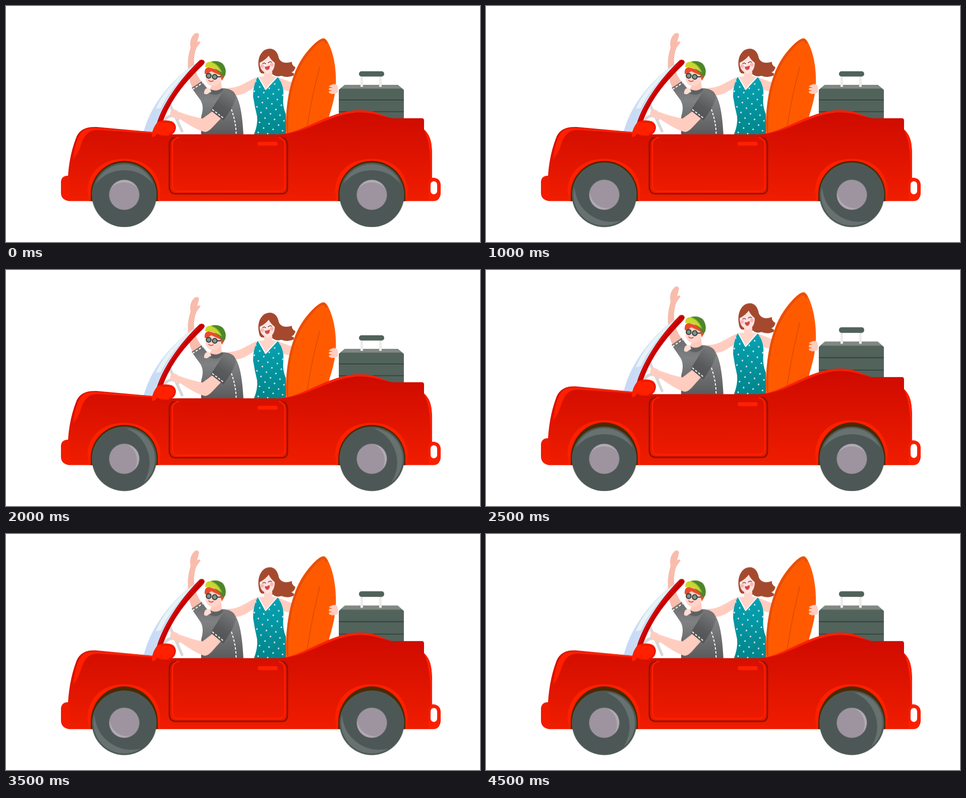
An HTML page for the animation above (5 s loop, 940x470 px).

```html
<!DOCTYPE html>
<html lang="en">
<head>
<meta charset="utf-8">
<title>Road trip</title>
<style>
html, body { margin: 0; width: 100%; height: 100%; overflow: hidden; background: #fff; }
svg { display: block; width: 100%; height: 100%; }
.car { transform-origin: 0 388px; animation: bounce 1s step-end infinite; }
.spin { transform-origin: 0 0; animation: spin 2.5s steps(5) infinite; }
@keyframes bounce { 0% { transform: none; } 50% { transform: scaleY(1.062); } }
@keyframes spin { to { transform: rotate(-360deg); } }
.line { fill: none; stroke-linecap: round; stroke-linejoin: round; }
.stitch { fill: none; stroke: #fff; stroke-width: 2; stroke-dasharray: 4.5 3; }
.skin { fill: #ffcdc0; }
.glow { fill: #ff2000; }
</style>
</head>
<body>
<svg viewBox="0 0 940 470">
<defs>
  <linearGradient id="paint" x2="0" y2="1"><stop offset="0" stop-color="#cd0a00"/><stop offset="1" stop-color="#f01d00"/></linearGradient>
  <linearGradient id="shirt" x2="0" y2="1"><stop offset="0" stop-color="#6b6c6e"/><stop offset=".35" stop-color="#808183"/><stop offset="1" stop-color="#595a5c"/></linearGradient>
  <linearGradient id="sleeve" x1="0" y1="1" x2=".5" y2="0"><stop offset="0" stop-color="#4e4f51"/><stop offset=".55" stop-color="#5a5b5d"/><stop offset="1" stop-color="#737476"/></linearGradient>
  <linearGradient id="dress" x2="0" y2="1"><stop offset="0" stop-color="#08a3b4"/><stop offset="1" stop-color="#008489"/></linearGradient>
  <linearGradient id="glass" x2="1" y2="0"><stop offset="0" stop-color="#c6d8f5"/><stop offset="1" stop-color="#d9e8f5"/></linearGradient>
  <pattern id="dots" width="19" height="20" patternUnits="userSpaceOnUse" patternTransform="rotate(8 520 200)">
    <g fill="#fff"><circle cx="4" cy="4" r="1.4"/><circle cx="13.5" cy="14" r="1.4"/></g>
  </pattern>
  <path id="gown" d="M497 145L500 141L514 167L537 141L541 144Q552 160 550 180Q548 200 555 215V258H491Q500 236 498 220Q493 200 490 180Q490 160 497 145Z"/>
  <g id="arch">
    <path class="glow" d="M-70 388.500L-73 368C-71 326-40 304.500 0 304.500S68 328 71.500 368L70 388.500Z"/>
    <path fill="#4a2900" d="M-66.500 388.500V375A66.500 66.500 0 0 1 66.500 375V388.500Z"/>
  </g>
  <g id="wheel">
    <circle r="64.300" fill="#4d5856"/>
    <path fill="#667170" d="M-57-22A61 61 0 0 1 57-22A73.700 73.700 0 0 0-57-22Z"/>
    <circle r="30" fill="#9d949f"/>
    <path fill="#b3abb5" d="M-26-13A29 29 0 0 1 26-13A34 34 0 0 0-26-13Z"/>
  </g>
</defs>

<g class="car">
  <!-- suitcase -->
  <path fill="#eeebeb" d="M703 138H708V162H703ZM740 138H745V162H740Z"/>
  <rect x="700" y="130" width="50" height="10.500" rx="5" fill="#50625b"/>
  <path fill="#52635c" d="M672 157H777L789 167V228H660V167Z"/>
  <path fill="#808981" d="M672 157H777L785 164.500H665Z"/>
  <path fill="#eeebeb" d="M703 152H708V161H703ZM740 152H745V161H740Z"/>
  <path class="line" stroke="#303b38" stroke-width="1.600" d="M661 187H788M661 210.500H788"/>

  <!-- woman -->
  <path class="skin" d="M539 142Q556 148 569 153L562 170L550 167Z"/>
  <path class="skin" d="M438 163C462 165 478 149 500 141L498 157C482 170 468 179 452 178Z"/>
  <path fill="#a5492e" d="M503 130Q497 110 505 96Q512 84 525 85Q538 87 541 104Q545 113 556 113Q562 113 567 111Q566 118 574 122Q572 130 566 132Q573 134 571 138Q560 144 546 139Q536 142 529 136L506 134Z"/>
  <path fill="#ffd5ca" d="M512 129H528V140L538 142L514 167L499 141L512 140Z"/>
  <path fill="#ffe3df" d="M503 113Q514 108 521 99Q525 107 533 113Q533 131 519 134Q503 131 503 113Z"/>
  <g fill="#ffb3b8"><circle cx="508" cy="120" r="3.500"/><circle cx="527" cy="117" r="3.500"/></g>
  <path class="line" stroke="#693a32" stroke-width="1.300" d="M509 115Q512 112 515 115M520 113Q523 110 527 112"/>
  <path fill="#d34a48" d="M513 121Q518 121 523 118.500Q524 127 518 127.500Q514 127 513 121Z"/>
  <use href="#gown" fill="url(#dress)"/>
  <use href="#gown" fill="url(#dots)"/>
  <path class="line" stroke="#fff" stroke-width="2" d="M501 142L515 166L537 142"/>

  <!-- surfboard -->
  <path fill="#ff5a00" d="M555.500 258C553 200 562 140 590 100C605 80 620 66 628 64.500Q633 63.500 637 70C652 95 658 140 652 175C648 200 642 212 640 224V240Z"/>
  <path class="line" stroke="#e44e0b" stroke-width="4" d="M558 250C556 200 565 140 593 102C607 82 620 70 628 67.500Q632 67 635 73"/>
  <path class="line" stroke="#dd4b05" stroke-width="1.600" d="M622 122C612 160 603 200 597 242"/>
  <path class="skin" d="M645 157Q655 153 658 160V172Q650 178 641 173L640 170L647 169L640 167L641 163L648 163L640 160Z"/>

  <!-- man -->
  <path fill="#f8bcac" d="M366 83C361 97 360 110 361 125C362 145 367 158 370 163L388 151C377 138 372 120 373 105Q374 92 378 83L386 72Q383 69 379 72L383 57Q380 51 374 55Q366 62 365 74Z"/>
  <path class="line" stroke="#d5dad7" stroke-width="5.500" d="M324 194L349 249M314 228Q326 211 342 225"/>
  <path fill="url(#shirt)" d="M368 163L388 150Q395 160 402 167L412 166Q427 162 440 165C460 170 468 200 471 258H387V240Q385 225 389 213C391 203 390 195 386 188Z"/>
  <path class="stitch" d="M370 166L390 153M447 206Q456 230 456.500 256"/>
  <path fill="#5f6062" d="M402 166L428 163L431 167Q420 183 402 173Z"/>
  <path fill="#ffcabc" d="M404 165L412 153L426 147L428 164Q415 172 404 165Z"/>
  <path class="skin" d="M409 210L390 224C375 222 355 215 343 211Q334 204 328 207Q324 211 326 217Q332 224 345 225C360 235 380 248 395 251Q402 250 410 241L427 223Z"/>
  <path fill="url(#sleeve)" d="M425 179Q435 161 449 169Q458 175 454 188Q448 206 431 228L406 208Z"/>
  <path class="stitch" d="M409 206L431 223"/>
  <path fill="#ffddd4" d="M393 175Q392 165 400 163Q406 164 407 171L403 173L398 176Z"/>
  <path fill="#ffd5cb" d="M396 132Q393 155 407 159Q421 160 426 148L430 134L403 125Z"/>
  <path fill="#e94c2b" d="M394 135Q393 123 402 122L430 130L433 141L428 149L425 138L416 134L407 130L398 136Z"/>
  <path fill="#4d862a" d="M406 111Q420 107 430 115Q438 125 435 137Q433 143 427 139Q421 126 402 119Z"/>
  <path fill="#c8d82d" d="M395 122Q395 110 407 111Q421 117 427 132Q413 121 395 122Z"/>
  <path class="line" stroke="#91b52b" stroke-width="1.500" d="M408 112Q421 116 428 132"/>
  <g fill="#78968f" stroke="#303735" stroke-width="2"><circle cx="402" cy="139" r="4.700"/><circle cx="414" cy="141" r="4.700"/><path d="M419 141L426 141"/></g>
  <path class="line" stroke="#d43c36" stroke-width="1.500" d="M402 148Q406 152 411 149"/>

  <!-- windshield -->
  <path fill="url(#glass)" d="M273 252C282 210 320 148 385 109C347 150 312 195 297 245L292 253Z"/>
  <path fill="#e7f3f5" d="M297 205C312 172 337 142 370 121C345 146 322 172 307 203Z"/>
  <path fill="#c70000" d="M384 108Q391 105 394 111Q394 115 388 120C347 160 326 191 311 230L299 234C310 198 342 148 384 108Z"/>
  <path class="line" stroke="#ed1008" stroke-width="1.400" d="M382 114C345 150 319 188 305 226"/>

  <!-- bodywork -->
  <path fill="url(#paint)" d="M123 338C125 310 130 285 140 260C147 245 160 240 180 241L280 250L325 255.500H545C590 251 640 211 695 207.800C735 206 745 219 766 223.500H825Q829 223.500 829 228V246C842 258 845 272 845 300V342Q862 342 862 358V373Q860 388.600 848 388.600H125Q109 386 109 372V350Q110 338 123 338Z"/>
  <path class="glow" d="M134 300C137 277 142 258 152 249C160 243 170 242 184 243L293 251V254L184 247C163 246 155 258 149 276Q144 293 134 304Z"/>
  <path class="glow" d="M545 255.500C590 251 640 211 695 207.800C735 206 745 219 766 223.500C735 217 727 211 695 212C642 216 594 254 545 255.500Z"/>
  <path class="glow" d="M829 246C842 258 845 272 845 300V342L842 345Q844 278 829 246Z"/>
  <path class="glow" opacity=".3" d="M123 338Q127 340 127 352V374Q127 386 132 388H125Q109 386 109 372V350Q110 338 123 338Z"/>
  <path class="glow" opacity=".75" d="M845 342Q862 342 862 358V373Q860 388 848 388H838V354Q839 343 845 342Z"/>
  <rect x="842" y="349" width="13" height="26" rx="6.500" fill="#fff"/>
  <use href="#arch" x="234.500"/>
  <use href="#arch" x="725.500"/>
  <path class="line" stroke="#941400" stroke-width="3" d="M337 262Q325 262 324 275V362Q325 374 337 374H546Q558 374 558 362V275Q557 263 546 262"/>
  <path class="line" stroke="#ff2000" stroke-width="2.500" d="M342 262Q331 263 330 276V358Q331 369 342 369H540Q552 368 553 358V276Q552 264 542 262"/>
  <rect class="glow" x="499" y="270.500" width="40" height="7.500" rx="3.750"/>
  <path class="glow" d="M300 232Q306 227 320 228Q337 229 337 243Q335 258 318 258Q303 258 300 254L296 259Q290 264 289 257Q291 242 300 232Z"/>
  <path class="line" stroke="#d91300" stroke-width="1.500" d="M307 231H320Q334 232 335 243Q333 254 323 256"/>
</g>

<g transform="translate(234.500 376)"><use class="spin" href="#wheel"/></g>
<g transform="translate(725.500 376)"><use class="spin" href="#wheel"/></g>
</svg>
</body>
</html>
```
